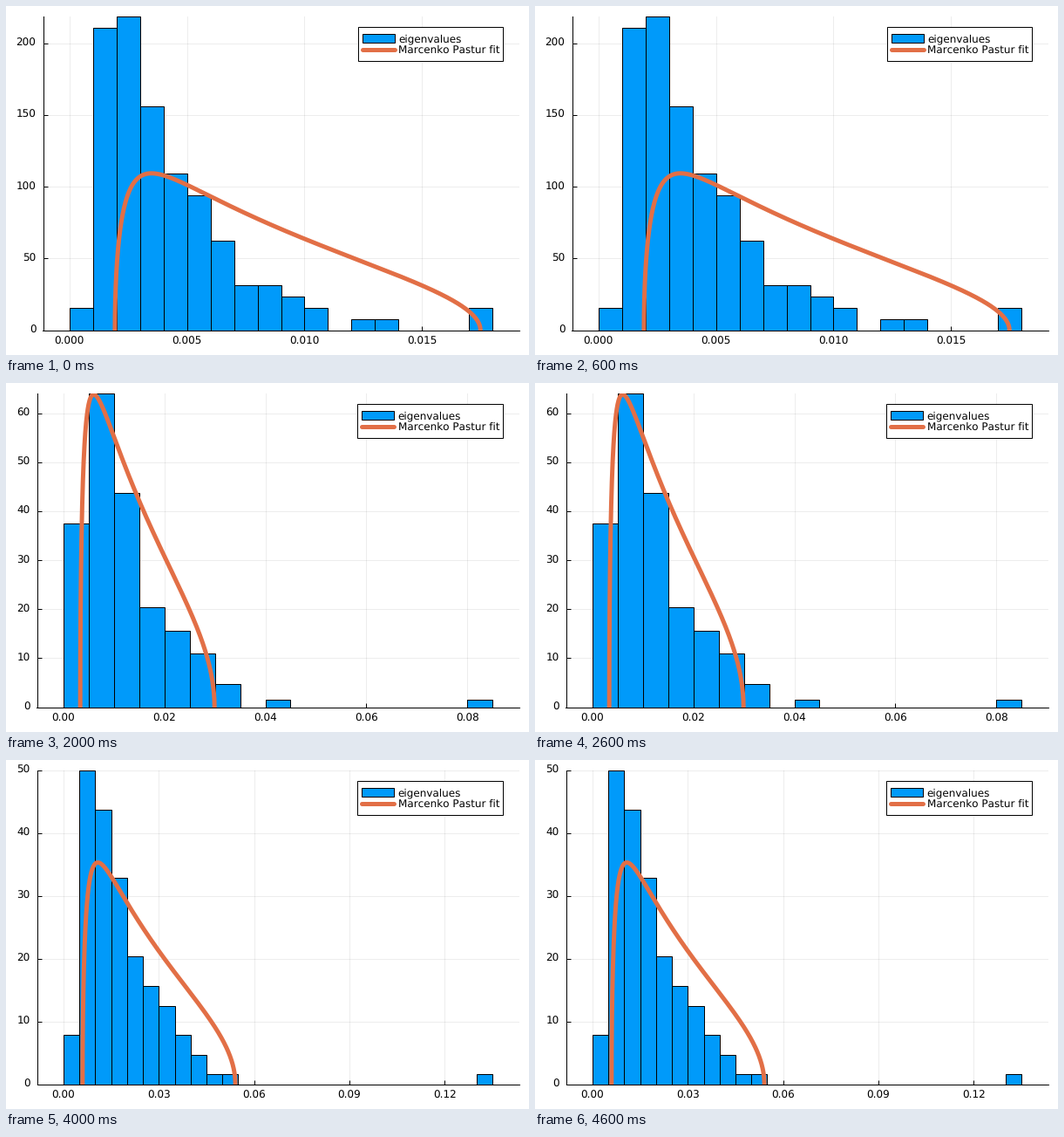
These frames come from a looping animation (600x400 px, 5000 ms). A matplotlib script:

```python
import numpy as np
import matplotlib.pyplot as plt
from matplotlib.animation import FuncAnimation
from matplotlib.lines import Line2D
from matplotlib.patches import Rectangle

W, H, DPI = 600, 400, 100
PX = 72 / DPI
BLUE, ORANGE = "#009afa", "#e26f46"
TOP, BASE, RIGHT = 11.8, 371.5, 588.5
SAMPLES = 128

plt.rcParams.update({
    "font.family": "DejaVu Sans",
    "font.size": 11.7 * PX,
    "text.hinting": "none",
    "text.hinting_factor": 1,
})

# bin width, counts from zero, lone outlier bins, variance, axis left, ticks, label format
STEPS = [
    (0.001, [2, 27, 28, 20, 14, 12, 8, 4, 4, 3, 2, 0, 1, 1], {17: 2}, 0.007766,
     42.5, 0.005, 50, "{:.3f}"),
    (0.002, [4, 27, 23, 17, 13, 11, 7, 6, 6, 3, 4, 2, 2, 1], {16: 1, 29: 1}, 0.00955,
     42.5, 0.01, 25, "{:.2f}"),
    (0.005, [24, 41, 28, 13, 10, 7, 3], {8: 1, 16: 1}, 0.0133,
     35.5, 0.02, 10, "{:.2f}"),
    (0.005, [12, 37, 29, 20, 10, 8, 6, 3, 1, 1], {21: 1}, 0.01691,
     35.5, 0.025, 10, "{:.3f}"),
    (0.005, [5, 32, 28, 21, 13, 10, 8, 5, 3, 1, 1], {26: 1}, 0.02404,
     35.5, 0.03, 10, "{:.2f}"),
]

fig = plt.figure(figsize=(W / DPI, H / DPI), dpi=DPI, facecolor="white")
ax = fig.add_axes([0, 0, 1, 1])
overlay = fig.add_axes([0, 0, 1, 1], zorder=2)


def marchenko_pastur(var, ratio=0.25):
    lo, hi = var * (1 - ratio ** 0.5) ** 2, var * (1 + ratio ** 0.5) ** 2
    # cosine spacing keeps the steep ends smooth
    x = lo + (hi - lo) * (1 - np.cos(np.linspace(0, np.pi, 500))) / 2
    root = np.sqrt(np.maximum((hi - x) * (x - lo), 0))
    return x, root / (2 * np.pi * var * ratio * x)


def draw_legend(left):
    overlay.clear()
    overlay.set(xlim=(0, W), ylim=(H, 0))
    overlay.axis("off")
    overlay.add_patch(Rectangle((left, 23.5), 570 - left, 39, fc="white", ec="black", lw=PX))
    x = left + 5.8
    overlay.add_patch(Rectangle((x, 31.5), 36.5, 10, fc=BLUE, ec="black", lw=PX))
    overlay.add_line(Line2D([x, x + 36.5], [49.5, 49.5], color=ORANGE, lw=5 * PX,
                            solid_capstyle="round"))
    overlay.text(left + 47, 41, "eigenvalues", va="baseline")
    overlay.text(left + 47, 54, "Marcenko Pastur fit", va="baseline")


def draw(i):
    width, counts, outliers, var, left, xstep, ystep, fmt = STEPS[i]
    bins = dict(enumerate(counts)) | outliers
    bins = {k: n / (SAMPLES * width) for k, n in bins.items() if n}
    xmax, ymax = (max(bins) + 1) * width, max(bins.values())

    ax.clear()
    ax.set_position([left / W, 1 - BASE / H, (RIGHT - left) / W, (BASE - TOP) / H])
    ax.bar([k * width for k in bins], list(bins.values()), width, align="edge",
           color=BLUE, edgecolor="black", linewidth=PX)
    ax.plot(*marchenko_pastur(var), color=ORANGE, lw=5 * PX, zorder=3)

    pad = 0.0618 * xmax
    ax.set(xlim=(-pad, xmax + pad), ylim=(0, ymax))
    xticks = np.arange(0, xmax, xstep)
    if xmax + 1e-9 >= xticks[-1] + xstep:
        xticks = np.append(xticks, xticks[-1] + xstep)
    ax.set_xticks(xticks, [fmt.format(x) for x in xticks])
    ax.set_yticks(np.arange(0, ymax + 1e-9, ystep))
    ax.tick_params(direction="in", length=5 * PX, width=PX)
    ax.tick_params(axis="x", pad=7.5 * PX)
    ax.tick_params(axis="y", pad=8 * PX)
    for label in ax.get_yticklabels():
        label.set_va("center")
    ax.set_axisbelow(True)
    ax.grid(color="black", alpha=0.07, lw=PX)
    ax.spines[["top", "right"]].set_visible(False)
    ax.spines[["left", "bottom"]].set_linewidth(PX)

    draw_legend(403.5 if left > 40 else 402.5)
    return []


anim = FuncAnimation(fig, draw, frames=len(STEPS), interval=1000,
                     init_func=lambda: [], repeat=True, repeat_delay=0)
plt.show()
```
